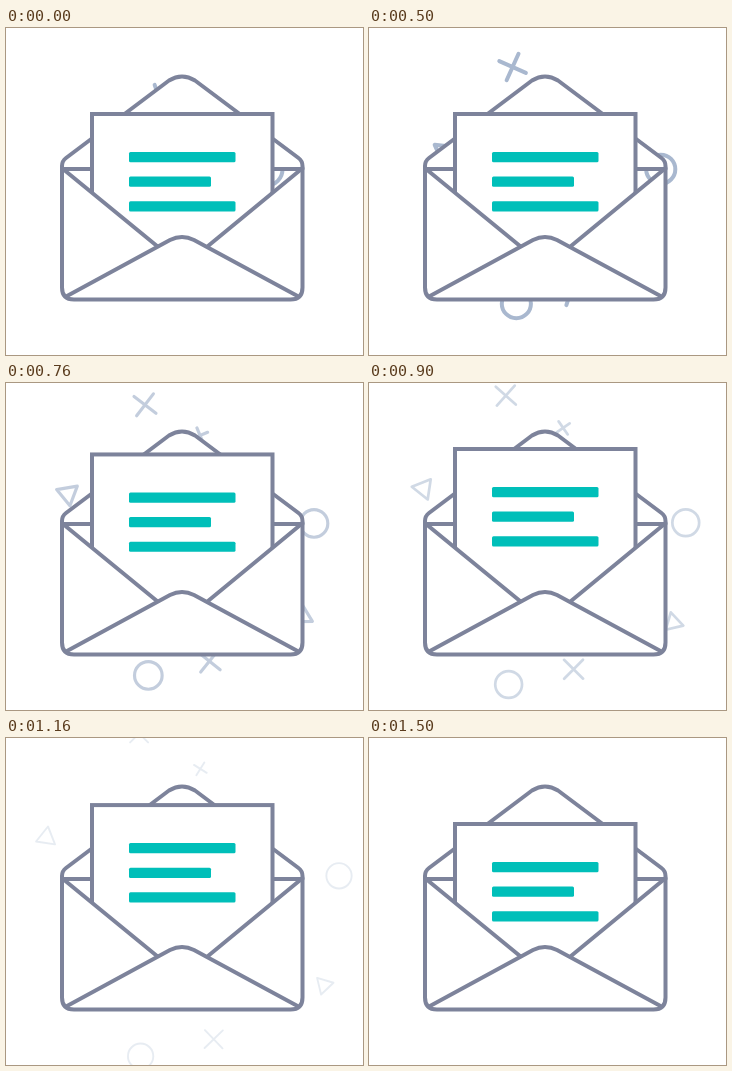
These frames come from a looping animation (357x327 px, 2.02 s). An HTML page with a canvas:

```html
<!DOCTYPE html>
<html lang="en">
<head>
<meta charset="utf-8">
<title>Open envelope</title>
<style>
  html, body { margin: 0; width: 100%; height: 100%; overflow: hidden; background: #fff; }
  canvas { display: block; }
</style>
</head>
<body>
<canvas id="stage" width="357" height="327"></canvas>
<script>
const ctx = document.getElementById('stage').getContext('2d');
const LOOP = 2020, STEP = 20, END = 1500;
const INK = '#7d839b', CONFETTI = '#a9b8cf', TEAL = '#00bfb9';

const back = new Path2D('M56 141V138Q56 133 60 130L163 52.5Q176 44.5 189 52.5L292.500 130Q296.500 133 296.500 138V141Z');
const pocket = new Path2D('M56 141L151 218L176 205L202 218L296.500 141V259.500Q296.500 271.500 284.500 271.500H68Q56 271.500 56 259.500Z');
const seams = new Path2D('M57 141L151 218M295.500 141L202 218M61 268L164 212Q176 206 188 212L291.500 268');
const body = new Path2D('M56 140V259.500Q56 271.500 68 271.500H284.500Q296.500 271.500 296.500 259.500V140');

const cross = r => ctx.stroke(new Path2D(`M${-r} 0H${r}M0 ${-r}V${r}`));
const ring = r => {
  ctx.beginPath();
  ctx.arc(0, 0, r, 0, Math.PI * 2);
  ctx.stroke();
};
const triangle = r => {
  const x = -r / 2, y = r * Math.sqrt(3) / 2;
  ctx.stroke(new Path2D(`M${r} 0L${x} ${y}V${-y}Z`));
};

const spin = t => 105 - 97 * (t / 1360) ** 2.37;
const settle = t => (1360 - t) ** 2 * 1e-5;

// Each piece: shape, starting radius, and x, y, angle in degrees at time t
const pieces = [
  [cross, 16, t => [154 - .023 * t + 4.3e-6 * t * t, 72 - .066 * t, 45 - 4.8e-5 * (t - 1160) ** 2]],
  [cross, 9.5, t => [193.5 + t / 1360, 93.5 - .054 * t, 55 - .0885 * (t - 900)]],
  [cross, 16, t => [201 + 10 * (t / 1360) ** 2.5, 234.5 + .0575 * t, 47 - 9.3e-5 * (t - 1060) ** 2]],
  [ring, 16, t => [157 - .0193 * t, 243.4 + .0645 * t, 0]],
  [ring, 16, t => [260.5 + .0625 * t, 141.5 - 6 * (t / 1360) ** 3, 0]],
  [triangle, 14, t => [103 - .054 * t, 98 + 3.56 * settle(t), spin(t)]],
  [triangle, 12.5, t => [257 + .0525 * t, 248.8 - 4.35 * settle(t), spin(t) - 52]]
];

const clamp = v => Math.min(1, Math.max(0, v));
const ease = v => (1 - Math.cos(Math.PI * clamp(v))) / 2;

function drawPieces(t) {
  if (t >= END) return;
  ctx.strokeStyle = CONFETTI;
  ctx.lineWidth = Math.min(4, 5.6 - .0032 * t);
  ctx.globalAlpha = clamp((END - t) / 1000) ** 1.2;
  for (const [shape, radius, pose] of pieces) {
    const [x, y, angle] = pose(t);
    ctx.save();
    ctx.translate(x, y);
    ctx.rotate(angle * Math.PI / 180);
    shape(radius * (1 - .00018 * t));
    ctx.restore();
  }
  ctx.globalAlpha = 1;
}

function drawLetter(y) {
  ctx.save();
  ctx.translate(0, y);
  ctx.lineJoin = 'miter';
  ctx.fillRect(86, 86, 180.5, 160);
  ctx.strokeRect(86, 86, 180.5, 160);
  ctx.fillStyle = TEAL;
  [106.5, 82, 106.5].forEach((width, i) => {
    ctx.beginPath();
    ctx.roundRect(123, 124 + 24.6 * i, width, 10.2, 1.5);
    ctx.fill();
  });
  ctx.restore();
}

function draw(t) {
  ctx.fillStyle = '#fff';
  ctx.fillRect(0, 0, 357, 327);
  ctx.lineCap = ctx.lineJoin = 'round';
  drawPieces(t);

  ctx.strokeStyle = INK;
  ctx.lineWidth = 4;
  ctx.fill(back);
  ctx.stroke(back);
  drawLetter(-20 * (ease((t - 500) / 400) - ease((t - 1100) / 400)));
  ctx.fill(pocket);
  ctx.stroke(seams);
  ctx.stroke(body);
}

function tick() {
  const t = performance.now() % LOOP;
  draw(Math.floor(t / STEP) * STEP);
  requestAnimationFrame(tick);
}
tick();
</script>
</body>
</html>
```
